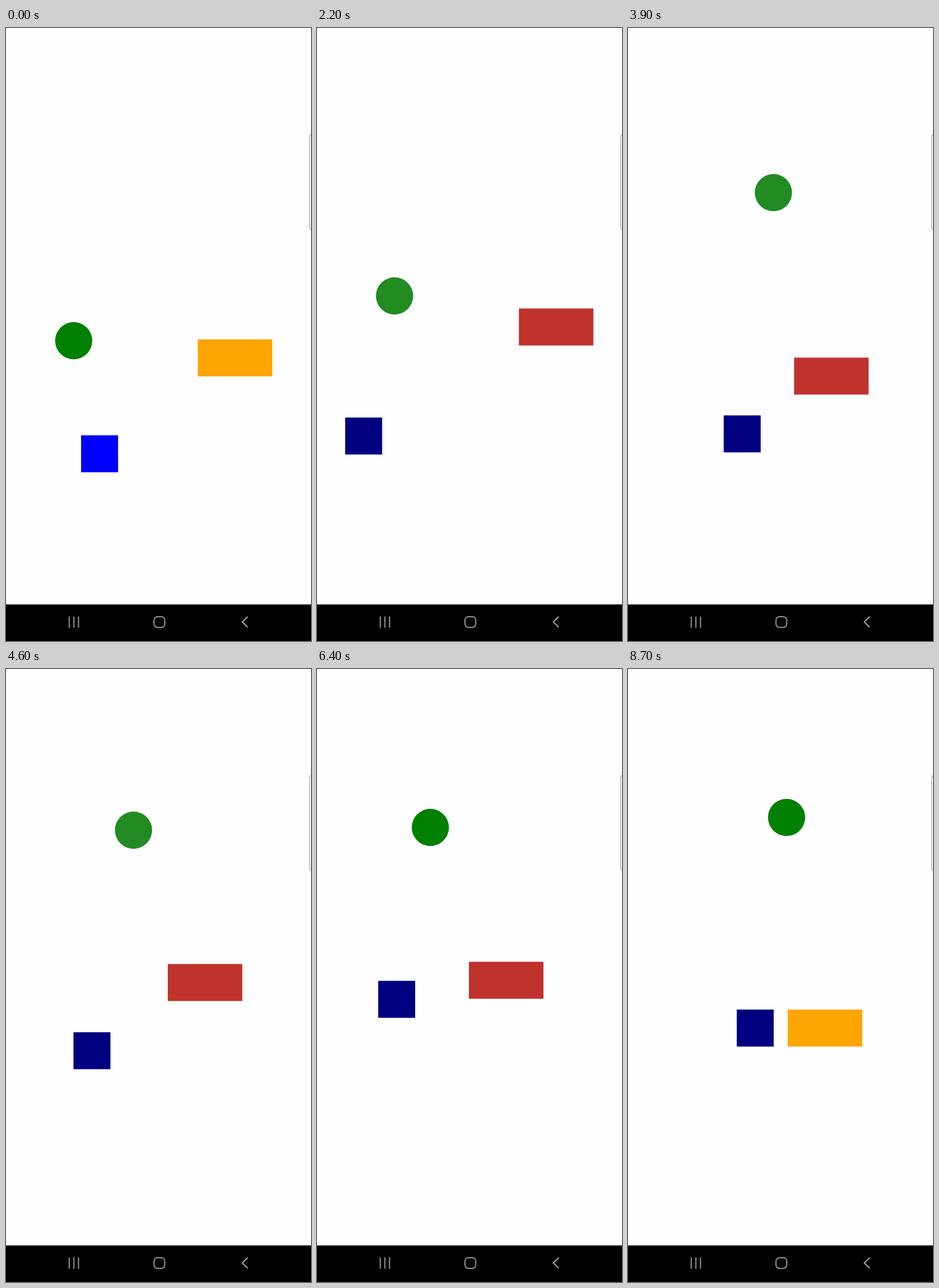
An HTML page for the animation above (8800 ms loop, 528 by 1061 pixels).

```html
<!DOCTYPE html>
<html lang="en">
<head>
<meta charset="utf-8">
<title>Dragging shapes</title>
<style>
  html, body { margin: 0; width: 100%; height: 100%; overflow: hidden; background: #fefdff; }
  svg { display: block; width: 528px; height: 1061px; }
</style>
</head>
<body>
<svg viewBox="0 0 528 1061">
  <rect width="528" height="1061" fill="#fefdff"/>
  <path d="M529 183.5Q525.5 184.5 525.5 190V343Q525.5 348.5 529 349.5" fill="#fefdff" stroke="#aaa" stroke-width="1.3"/>
  <circle id="circle" cx="32.2" cy="32.2" r="32.2"/>
  <rect id="bar" width="129" height="64"/>
  <rect id="square" width="64" height="64"/>
  <rect y="997.7" width="528" height="64"/>
  <g fill="none" stroke="#969696" stroke-width="2">
    <path d="M109.5 1018.5V1038M117.5 1018.5V1038M125.5 1018.5V1038"/>
    <rect x="256.2" y="1018.9" width="18.6" height="18.6" rx="6"/>
    <path d="M418.3 1018.8L409.2 1028L418.3 1037.2" stroke-width="2.4"/>
  </g>
</svg>
<script>
const LOOP = 8800, STEP = 100;

// Times at which every shape passes through its next pose.
const poseTimes = [0, 1500, 2900, 3900, 5400, 7400, 8700];

// A shape changes colour and moves only while a finger holds it.
const shapes = [
  {
    id: 'circle', idle: '#008000', active: '#228b22', held: [[300, 5200], [6900, 8400]],
    poses: [[85, 509], [35, 438], [169, 425], [219.5, 252.7], [164, 242], [198.3, 161.2], [242.3, 224.7]]
  },
  {
    id: 'bar', idle: '#ffa500', active: '#c0322c', held: [[400, 8600]],
    poses: [[332, 539], [350, 542], [349, 429], [287.5, 570.5], [271, 437.5], [255, 576], [276.5, 589.5]]
  },
  {
    id: 'square', idle: '#0000ff', active: '#000080', held: [[500, 7400], [7700, LOOP]],
    poses: [[130, 705], [105.5, 734.5], [-8, 614], [165.7, 670.5], [57, 577.5], [155, 502], [188.3, 589.5]]
  }
];
for (const shape of shapes) shape.node = document.getElementById(shape.id);

const smooth = u => u * u * (3 - 2 * u);
const mix = (a, b, u) => a + (b - a) * u;
const clamp = (value, low, high) => Math.min(high, Math.max(low, value));

function position({ held, poses }, time) {
  const next = clamp(poseTimes.findIndex(t => t >= time), 1, poses.length - 1);
  const from = poseTimes[next - 1], to = poseTimes[next];
  const [grab, release] = held.find(([a, b]) => a < to && b > from);
  const begin = Math.max(from, grab), end = Math.min(to, release);
  const u = smooth(clamp((time - begin) / (end - begin), 0, 1));
  return poses[next].map((value, axis) => mix(poses[next - 1][axis], value, u));
}

function draw(time) {
  for (const shape of shapes) {
    const touched = shape.held.some(([grab, release]) => time >= grab && time < release);
    shape.node.setAttribute('fill', touched ? shape.active : shape.idle);
    shape.node.setAttribute('transform', `translate(${position(shape, time)})`);
  }
}

const start = performance.now();
function tick() {
  const elapsed = (performance.now() - start) % LOOP;
  draw(Math.floor(elapsed / STEP) * STEP);
  requestAnimationFrame(tick);
}
tick();
</script>
</body>
</html>
```
